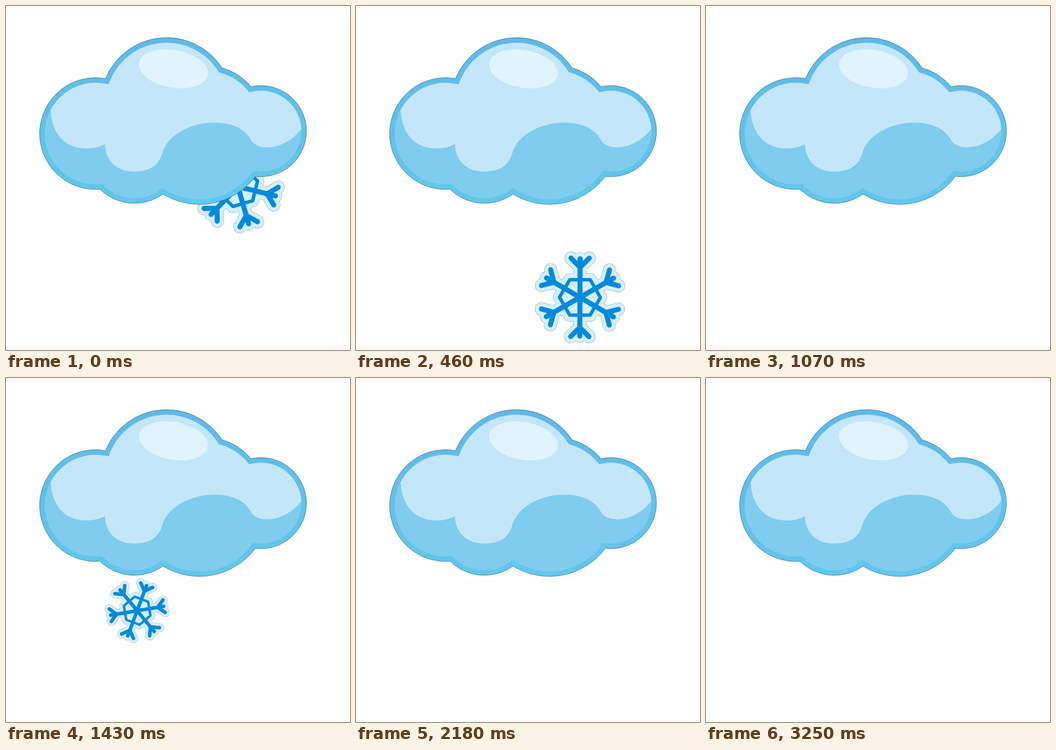
Recreate the animation shown at these times as an HTML page. Size 640 by 640 pixels, loop 3290 ms.

```html
<!DOCTYPE html>
<html lang="en">
<head>
<meta charset="utf-8">
<title>Snow cloud</title>
<style>
  html, body { margin: 0; width: 100%; height: 100%; overflow: hidden; background: #fff; }
  svg { display: block; width: 100%; height: 100%; }
  .flake { fill: none; stroke-linecap: round; stroke-linejoin: round; }
</style>
</head>
<body>
<svg viewBox="0 0 640 640">
  <defs>
    <path id="cloud" d="M185 135 A123 123 0 0 1 402 115 A110 110 0 0 1 456 150
      A84.8 84.8 0 1 1 464 317 A130 130 0 0 1 292 350 A91 91 0 0 1 175 341
      A104 104 0 1 1 185 135 Z"/>
    <clipPath id="inside"><use href="#cloud"/></clipPath>
    <linearGradient id="rim" gradientUnits="userSpaceOnUse" x1="0" y1="59" x2="0" y2="369">
      <stop offset="0" stop-color="#5eb9ea"/>
      <stop offset="1" stop-color="#62c8ec"/>
    </linearGradient>
  </defs>
  <g id="snow"></g>
  <g clip-path="url(#inside)">
    <use href="#cloud" fill="#80ccef"/>
    <path fill="#c3e7f9" d="M83 193 C85 236 108 265 150 265 C163 265 175 262 184 257
      C185 288 206 308 238 308 C266 308 284 298 291 273 C300 241 342 217 388 217
      C420 217 444 228 455 248 C460 258 472 263 486 263 C510 263 534 249 550 228
      H570 V40 H83 Z"/>
    <ellipse rx="65" ry="35" transform="translate(311.5 117) rotate(10)" fill="#e1f3fc"/>
    <use href="#cloud" fill="none" stroke="url(#rim)" stroke-width="19"/>
  </g>
  <use href="#cloud" fill="none" stroke="#20384a" stroke-opacity=".6" stroke-width=".9"/>
</svg>
<script>
const LOOP = 3290, FPS = 28, SPIN = 35, LIFE = 1.08;

// Seconds, pixels and degrees; each flake falls, drifts and spins from its start.
const flakes = [
  { start: 0, x: 431.5, y: 336, angle: 14, size: 1, drift: -32, fall: 482, drag: 82, color: '#038adc' },
  { start: 1.1, x: 244, y: 291, angle: 39, size: .695, drift: 0, fall: 432, drag: 0, color: '#038adc' },
  { start: 2.175, x: 352.5, y: 158, angle: 2.5, size: .62, drift: 0, fall: 500, drag: 0, color: '#55c4f6' }
];

const polar = (r, deg, side = 0) => {
  const a = deg * Math.PI / 180, c = Math.cos(a), s = Math.sin(a);
  return (r * c - side * s).toFixed(2) + ' ' + (r * s + side * c).toFixed(2);
};
const turns = Array.from({ length: 6 }, (_, i) => i * 60);
const arms = turns.map(a =>
  `M0 0L${polar(72, a)}M${polar(73, a, -17)}L${polar(56, a)}L${polar(73, a, 17)}`).join('');
const ring = 'M' + turns.map(a => polar(38, a + 30)).join('L') + 'Z';

const layer = (d, color, width) => `<path d="${d}" stroke="${color}" stroke-width="${width}"/>`;
const snow = document.getElementById('snow');
snow.innerHTML = flakes.map(f => '<g class="flake">' +
  layer(arms + ring, '#96aab4', 24.4) +
  layer(arms + ring, '#d5effb', 23) +
  layer(ring, f.color, 6.4) +
  layer(arms, f.color, 9.4) + '</g>').join('');

// Frames start on whole hundredths of a second.
const startOf = i => Math.round(i * 100 / FPS) * 10;

function draw(ms) {
  let i = Math.floor(ms * FPS / 1000) + 1;
  while (startOf(i) > ms) i--;
  flakes.forEach((f, n) => {
    const g = snow.children[n], t = i / FPS - f.start;
    g.style.display = t >= 0 && t < LIFE ? '' : 'none';
    const x = f.x + f.drift * t;
    const y = f.y + f.fall * t - f.drag * t * t;
    g.setAttribute('transform',
      `translate(${x} ${y}) rotate(${f.angle + SPIN * t}) scale(${f.size})`);
  });
}

const begin = performance.now();
function tick() {
  draw((performance.now() - begin) % LOOP);
  requestAnimationFrame(tick);
}
tick();
</script>
</body>
</html>
```
